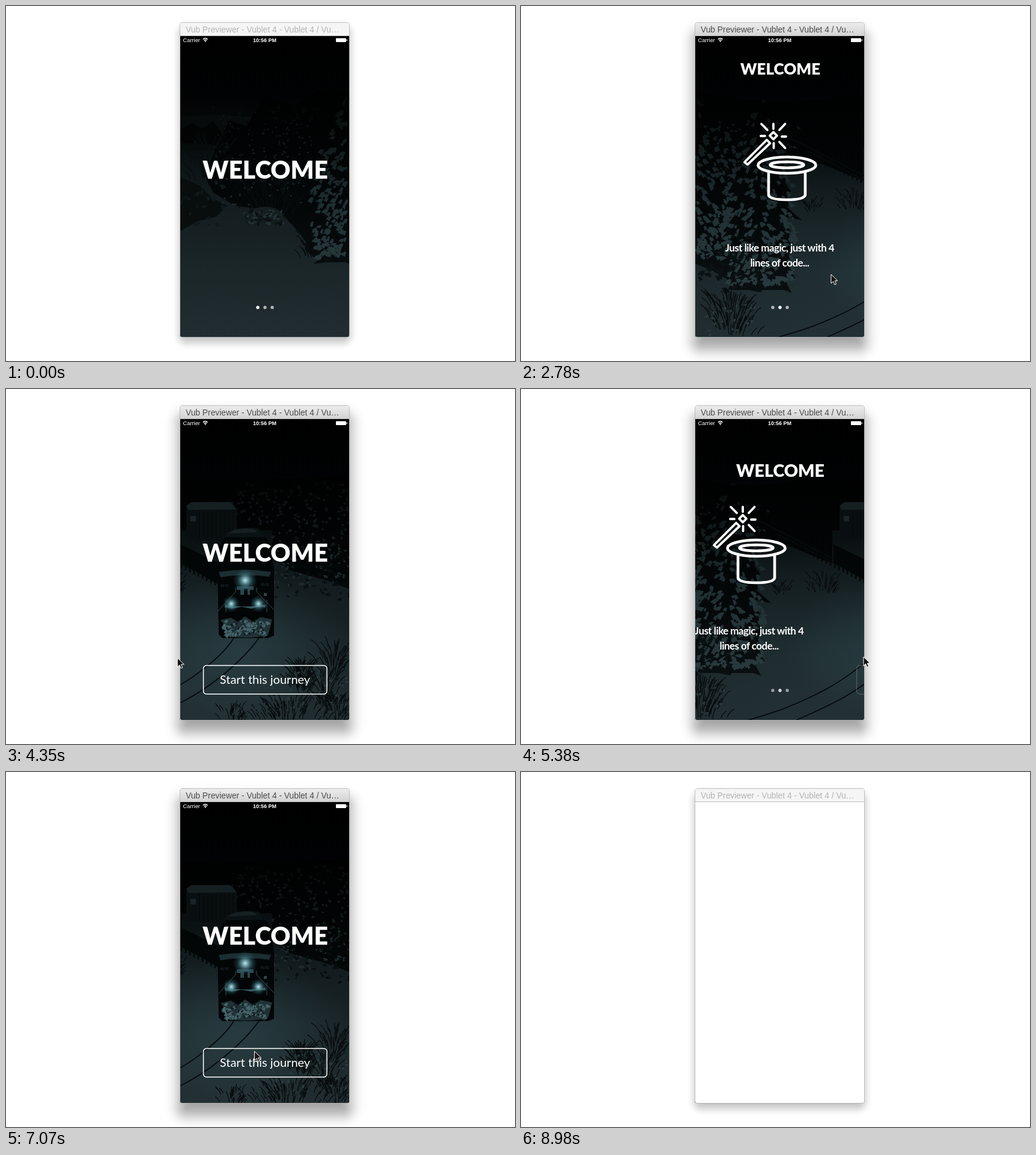
Recreate the animation shown at these times as an HTML page. Size 847 px wide and 590 px high, loop 9.08 s.

```html
<!DOCTYPE html>
<html lang="en">
<head>
<meta charset="utf-8">
<title>Welcome tour</title>
<style>
  html, body { margin: 0; width: 100%; height: 100%; overflow: hidden; background: #fff; }
  svg { display: block; width: 847px; height: 590px; }
  .ui { font-family: "Liberation Sans", Arial, sans-serif; }
  .tour { font-family: Lato, "Open Sans", sans-serif; fill: #fff; text-anchor: middle; }
  .line { fill: none; stroke: #fff; stroke-linecap: round; stroke-linejoin: round; }
</style>
</head>
<body>
<svg viewBox="0 0 847 590">
  <defs>
    <clipPath id="screen"><path d="M290 50H571V547Q571 550 568 550H293Q290 550 290 547Z"/></clipPath>
    <linearGradient id="bar" x2="0" y2="1">
      <stop stop-color="#ececec"/><stop offset="1" stop-color="#d2d2d2"/>
    </linearGradient>
    <linearGradient id="snow" gradientUnits="userSpaceOnUse" x1="0" x2="0" y1="50" y2="550">
      <stop stop-color="#000"/><stop offset=".2" stop-color="#010203"/>
      <stop offset=".35" stop-color="#080d0e"/><stop offset=".55" stop-color="#131c1e"/>
      <stop offset=".75" stop-color="#1a2528"/><stop offset="1" stop-color="#212d30"/>
    </linearGradient>
    <linearGradient id="dark" gradientUnits="userSpaceOnUse" x1="0" x2="0" y1="130" y2="550">
      <stop stop-color="#000"/><stop offset=".5" stop-color="#040708"/><stop offset="1" stop-color="#0c1416"/>
    </linearGradient>
    <linearGradient id="frost" gradientUnits="userSpaceOnUse" x1="0" x2="0" y1="130" y2="480">
      <stop stop-color="#030404"/><stop offset=".25" stop-color="#0f1618"/>
      <stop offset=".6" stop-color="#203033"/><stop offset="1" stop-color="#2a3b3f"/>
    </linearGradient>
    <radialGradient id="teal">
      <stop stop-color="#3d6068" stop-opacity=".32"/><stop offset="1" stop-color="#3d6068" stop-opacity="0"/>
    </radialGradient>
    <radialGradient id="lamp">
      <stop stop-color="#c3e8ee"/><stop offset=".25" stop-color="#78b0b9" stop-opacity=".85"/>
      <stop offset=".6" stop-color="#3f7c86" stop-opacity=".4"/><stop offset="1" stop-color="#2a5960" stop-opacity="0"/>
    </radialGradient>
  </defs>

  <g id="idleShadow"></g>
  <g id="liveShadow"></g>
  <path d="M289.5 550V32Q289.5 27.5 294 27.5H567Q571.500 27.5 571.500 32V547Q571.500 550.5 568 550.5H293Q289.500 550.5 289.500 547Z" fill="#fff" stroke="#999" stroke-opacity=".6"/>
  <path id="titlebar" d="M290 50V32Q290 28 294 28H567Q571 28 571 32V50Z"/>
  <path d="M290 49.5H571" stroke="#bbb"/>
  <text id="caption" class="ui" x="299" y="44" font-size="13.8">Vub Previewer - Vublet 4 - Vublet 4 / Vu…</text>

  <g clip-path="url(#screen)">
    <g id="tour">
      <g id="zoom"><g id="pano"></g></g>
      <g id="magic" class="tour">
        <g class="line" stroke-width="4.6">
          <ellipse cx="442.500" cy="264.500" rx="48" ry="13.500"/>
          <ellipse cx="442.500" cy="264" rx="28" ry="5"/>
          <path d="M412 278V314Q414 322 442.500 322T473 314V278"/>
          <path d="M372 259.500L409 222.500L414.500 228L377 263.500Z" stroke-width="3.800"/>
          <path d="M420 209.500L426 215.500L420 221.500L414 215.500Z" stroke-width="3.800"/>
          <path d="M420 196V204M420.500 228V236M399 216H406M434 217H441M400 196L410 206M439.500 196L430 206M439.500 236L430 226" stroke-width="3.800"/>
        </g>
        <g font-size="17" font-weight="700" letter-spacing="-.55">
          <text x="430.500" y="408">Just like magic, just with 4</text>
          <text x="430.500" y="433">lines of code...</text>
        </g>
      </g>
      <g id="start" class="tour">
        <rect class="line" x="328.500" y="459.500" width="205.500" height="47.500" rx="5" stroke-width="1.5"/>
        <text x="431" y="490" font-size="20">Start this journey</text>
      </g>
      <g id="dots" fill="#fff">
        <circle cx="419" cy="501" r="2.700"/><circle cx="431" cy="501" r="2.700"/><circle cx="443" cy="501" r="2.700"/>
      </g>
      <text id="welcome" class="tour" y="14.700" font-size="40.700" font-weight="900">WELCOME</text>
    </g>
    <g class="ui" fill="#fff">
      <text x="294.500" y="60" font-size="9.300">Carrier</text>
      <text x="430.500" y="60" font-size="9" font-weight="700" text-anchor="middle">10:56 PM</text>
      <path class="line" d="M328 55.200Q331.700 51.800 335.400 55.200M329.700 57Q331.700 55.200 333.700 57" stroke-width="1.200"/>
      <circle cx="331.700" cy="58.700" r="1.100"/>
      <rect x="549" y="53.500" width="17" height="6.500" rx="1"/>
      <rect x="566.700" y="55.500" width="1.200" height="2.600"/>
    </g>
  </g>
  <path id="cursor" d="M0 0V15L3.600 11.700L6 17.200L8.600 16.100L6.200 10.700H11Z" fill="#111" stroke="#fff"/>
</svg>

<script>
const LOOP = 9080, PAGE = 281;
const $ = id => document.getElementById(id);
const attr = (el, name, value) => el.setAttribute(name, value);

let seed = 11;
const rnd = () => (seed = seed * 16807 % 2147483647) / 2147483647;
const span = (a, b) => a + (b - a) * rnd();
const path = (d, extra) => `<path d="${d}" ${extra}/>`;
const fill = (d, color) => path(d, `fill="${color}"`);
const glow = (x, y, rx, ry, id, opacity = 1) =>
  `<ellipse cx="${x}" cy="${y}" rx="${rx}" ry="${ry}" fill="url(#${id})" opacity="${opacity}"/>`;

// One drooping patch
const patch = (x, y, w, h) =>
  `M${x.toFixed(1)} ${y.toFixed(1)}q${w * .6} ${-h * .6} ${w} ${h}q${-w * .4} ${-h * .2} ${-w * .5} ${h * .3}t${-w * .5} ${-h * 1.3}`;

function dabs(x0, x1, y0, y1, count, size = 8, color = "url(#frost)") {
  let d = "";
  for (let i = 0; i < count; i++)
    d += patch(span(x0, x1), span(y0, y1), span(.4, 1) * size * (rnd() < .5 ? -1 : 1), size * span(.2, .5));
  return fill(d, color);
}

function tree(cx, top, base, width, count) {
  const tiers = 16, reach = f => width / 2 * Math.sin(f * 2.2);
  const side = dir => {
    const pts = [];
    for (let i = 1; i <= tiers; i++) {
      const f = i / tiers, y = top + (base - top) * f, r = dir * reach(f);
      pts.push(`${cx + r * span(.8, 1.15)} ${y + span(-4, 4)}`, `${cx + r * span(.65, .85)} ${y - 2}`);
    }
    return pts;
  };
  const outline = `M${cx} ${top}L${side(1).join("L")}L${side(-1).reverse().join("L")}Z`;
  let snow = "";
  for (let i = 0; i < count; i++) {
    const f = Math.sqrt(rnd()), off = span(-.92, .92) * reach(f);
    snow += patch(cx + off, top + (base - top) * f * .96, span(5, 13) * (off < 0 ? -1 : 1), span(3, 7));
  }
  return fill(outline, "url(#dark)") + fill(snow, "url(#frost)");
}

// Loose twigs, denser towards the middle
function scrub(cx, cy, w, h, count) {
  let d = "";
  for (let i = 0; i < count; i++) {
    const lean = span(-.5, .5), len = span(.15, .4) * h;
    d += `M${cx + lean * w * span(.3, 1)} ${cy + span(-.5, .5) * h}q${lean * len * .4} ${-len * .6} ${lean * len * 1.8} ${-len}`;
  }
  return path(d, 'fill="none" stroke="#070c0d" stroke-width="1.2" stroke-linecap="round"');
}

function train() {
  const lamps = [[398, 318, 20], [375, 357, 14], [420, 357, 14]];
  const rail = 'fill="none" stroke="#3c575d" stroke-width=".9"';
  let ribs = "";
  for (let x = 322; x < 383; x += 7) ribs += `M${x} 202V248`;
  return fill("M290 258L352 288V324L290 288Z", "#030607")
    + fill("M300 194L376 190L384 201V254L300 248Z", "#090f10")
    + fill("M300 194L308 188L374 188L384 200L304 201Z", "#151f21")
    + path(ribs, 'stroke="#050909" stroke-width="1.5"')
    + fill("M307 211h9v9h-9Z", "#1a2426")
    + fill("M352 300L356 262Q360 246 370 245H428Q438 248 440 262L446 300V410L436 414H360L354 408Z", "#030607")
    + fill("M362 246Q366 233 396 231T424 238L430 246Z", "#0b1214")
    + fill("M370 240Q378 233 396 232T418 238Z", "#162022")
    + fill("M354 304Q398 297 441 304L438 312Q398 306 357 313Z", "#1b2e32")
    + `<g class="ui" font-size="6" fill="#2c3f43"><text x="357" y="329">4172</text><text x="424" y="327">4172</text></g>`
    + fill("M429 339h5v5h-5Z", "#2f4246")
    + fill("M384 328H412V334H406V342H402V332H396V342H390V334H384Z", "#29454b")
    + path("M353 369L382 337V330M446 367L417 337V330M366 371V350M434 371V350", rail)
    + fill("M364 358Q397 365 432 358V363L420 362L408 365L392 362L376 365L364 363Z", "#38575d")
    + fill("M362 371H438V382H362Z", "#020405")
    + fill("M357 384L374 380L386 387L398 378L411 387L424 379L443 383L436 409Q400 417 362 410L370 400Z", "#203236")
    + dabs(364, 434, 384, 408, 60, 11, "#46656b")
    + dabs(368, 432, 384, 406, 22, 7, "#101c1f")
    + lamps.map(([x, y, r]) => glow(x, y, r, r, "lamp")).join("");
}

function panorama() {
  let fence = "";
  for (let i = 0; i < 24; i++) fence += `M${756 + i * 7} ${232 + i * 3.6}v15`;
  return `<rect x="280" y="40" width="870" height="520" fill="url(#snow)"/>`
    // forest and brook
    + fill("M290 184L340 181L410 184V240H290Z", "#070b0c")
    + fill("M290 205L310 194L325 204L345 192L362 215L350 231L290 228Z", "#020404")
    + fill("M350 235L372 190L400 200L430 150L480 165L520 140L640 150V425L520 425L497 404L500 390L465 352L430 338L380 332L345 310L330 282Z", "url(#dark)")
    + fill("M290 285L322 298L344 320L368 332L350 350L318 358L290 374Z", "#080d0e")
    + dabs(295, 360, 290, 365, 20, 12, "#10181a")
    + dabs(345, 520, 165, 330, 170, 6)
    + scrub(340, 260, 80, 70, 60) + scrub(440, 318, 120, 60, 110)
    + fill("M392 354Q400 338 424 334Q448 331 461 345Q470 356 456 362Q428 368 404 364Z", "#141d1f")
    + dabs(398, 460, 337, 362, 30, 9, "#090f10") + dabs(398, 460, 337, 360, 26, 9)
    + scrub(512, 400, 60, 40, 70)
    + glow(830, 450, 280, 190, "teal", .45)
    // hillside
    + fill("M575 150L720 160L850 150V290L780 262L730 250L712 330L700 410L706 440L680 476L650 470L600 440L560 424Z", "url(#dark)")
    + path(fence, 'stroke="#030606" stroke-width="2.5"')
    + path("M700 206L756 233L930 322M756 240L930 329", 'fill="none" stroke="#050a0b" stroke-width="2"')
    + dabs(575, 740, 190, 270, 70, 8)
    + tree(617, 190, 425, 110, 190)
    + tree(570, 148, 428, 132, 320)
    + tree(678, 150, 474, 126, 330)
    + dabs(575, 690, 395, 470, 45, 16, "#0a1113")
    + scrub(835, 325, 60, 30, 45) + scrub(765, 332, 40, 22, 28) + scrub(630, 518, 100, 60, 110)
    + dabs(590, 670, 495, 545, 20, 8)
    // railway
    + fill("M1005 150L1140 145V335L1095 318L1030 300L1005 280Z", "url(#dark)")
    + fill("M850 150H1005V235H850Z", "url(#dark)")
    + dabs(940, 1135, 155, 325, 280, 8)
    + dabs(1010, 1135, 270, 350, 60, 9, "#080d0f")
    + glow(955, 430, 180, 120, "teal")
    + path("M941 414C925 440 880 480 820 509S740 540 705 552M983 414C960 446 910 492 855 520S800 544 780 556", 'fill="none" stroke="#050a0c" stroke-width="1.8"')
    + `<g transform="translate(${2 * PAGE})">${train()}`
    + scrub(545, 452, 70, 50, 60) + scrub(492, 483, 50, 45, 110) + scrub(530, 500, 60, 50, 60)
    + scrub(470, 535, 150, 36, 110) + scrub(375, 540, 60, 26, 40) + scrub(550, 535, 60, 40, 60)
    + dabs(440, 571, 465, 545, 40, 7) + "</g>";
}

// Soft shadow: stacked boxes shrinking through the window edge
function shadow(blur, drop, alpha) {
  const steps = 20;
  let out = "";
  for (let k = 0; k < steps; k++) {
    const e = blur * (1 - 2 * k / steps), weight = alpha * (1 + Math.cos(Math.PI * e / blur) + .12) / steps;
    out += `<rect x="${290 - e}" y="${28 + drop - e}" width="${281 + 2 * e}" height="${522 + 2 * e}"
      rx="${Math.max(4, e + 12)}" fill-opacity="${weight}"/>`;
  }
  return out;
}

$("pano").innerHTML = panorama();
$("idleShadow").innerHTML = shadow(17, 8, .26);
$("liveShadow").innerHTML = shadow(29, 18, .42);

// [time, page]
const pages = [
  [1490, 0], [2150, .9], [2420, 1], [3350, 1], [4200, 1.82], [4345, 2],
  [4740, 2], [5620, 1], [6170, 1], [6840, 1.74], [7020, 2]
];
// [time, x, y]
const pointer = [
  [940, 580, 594], [1370, 512, 458], [1490, 512, 456], [2150, 260, 451], [2230, 260, 450],
  [2750, 516, 446], [3350, 516, 447], [4200, 285, 447], [4640, 286, 447], [4740, 300, 447],
  [5500, 589, 445], [5850, 500, 440], [6170, 500, 438], [6840, 293, 429], [7050, 413, 464],
  [7360, 453, 480], [8240, 453, 480], [8740, 812, 592]
];

function at(keys, t, col = 1) {
  if (t <= keys[0][0]) return keys[0][col];
  for (let i = 1; i < keys.length; i++) {
    const a = keys[i - 1], b = keys[i];
    if (t < b[0]) {
      const u = (t - a[0]) / (b[0] - a[0]);
      return a[col] + (b[col] - a[col]) * u * u * (3 - 2 * u);
    }
  }
  return keys[keys.length - 1][col];
}

function draw(t) {
  const live = t >= 1440 && t < 8980;
  attr($("idleShadow"), "visibility", live ? "hidden" : "visible");
  attr($("liveShadow"), "visibility", live ? "visible" : "hidden");
  attr($("titlebar"), "fill", live ? "url(#bar)" : "#f5f5f5");
  attr($("caption"), "fill", live ? "#4c4c4c" : "#b4b4b4");

  const page = at(pages, t);
  const out = (1 - Math.cos(Math.PI * Math.min(1, Math.max(0, (t - 7690) / 400)))) / 2;
  const grow = 1 + 2 * out;
  attr($("tour"), "opacity", 1 - out);
  attr($("zoom"), "transform", `translate(430.5 300) scale(${grow}) translate(-430.5 -300)`);
  attr($("pano"), "transform", `translate(${-PAGE * page})`);
  attr($("magic"), "transform", `translate(${PAGE * (1 - page)})`);
  attr($("start"), "transform", `translate(${PAGE * (2 - page)})`);
  attr($("start"), "opacity", Math.max(0, page - 1) * Math.max(0, 1 - 2 * out));
  attr($("dots"), "opacity", Math.min(1, 2 - page));
  [...$("dots").children].forEach((dot, i) => attr(dot, "opacity", i === Math.round(page) ? 1 : .65));

  const lift = 1 - Math.abs(page - 1);
  attr($("welcome"), "transform",
    `translate(431.5 ${272.5 - 167.5 * lift}) scale(${(1 - .362 * lift) * grow})`);
  attr($("welcome"), "opacity", 1 - out);

  attr($("cursor"), "visibility", t >= 960 && t < 8740 ? "visible" : "hidden");
  attr($("cursor"), "transform", `translate(${at(pointer, t)} ${at(pointer, t, 2)})`);
}

const begin = performance.now();
function tick() {
  draw((performance.now() - begin) % LOOP);
  requestAnimationFrame(tick);
}
tick();
</script>
</body>
</html>
```
